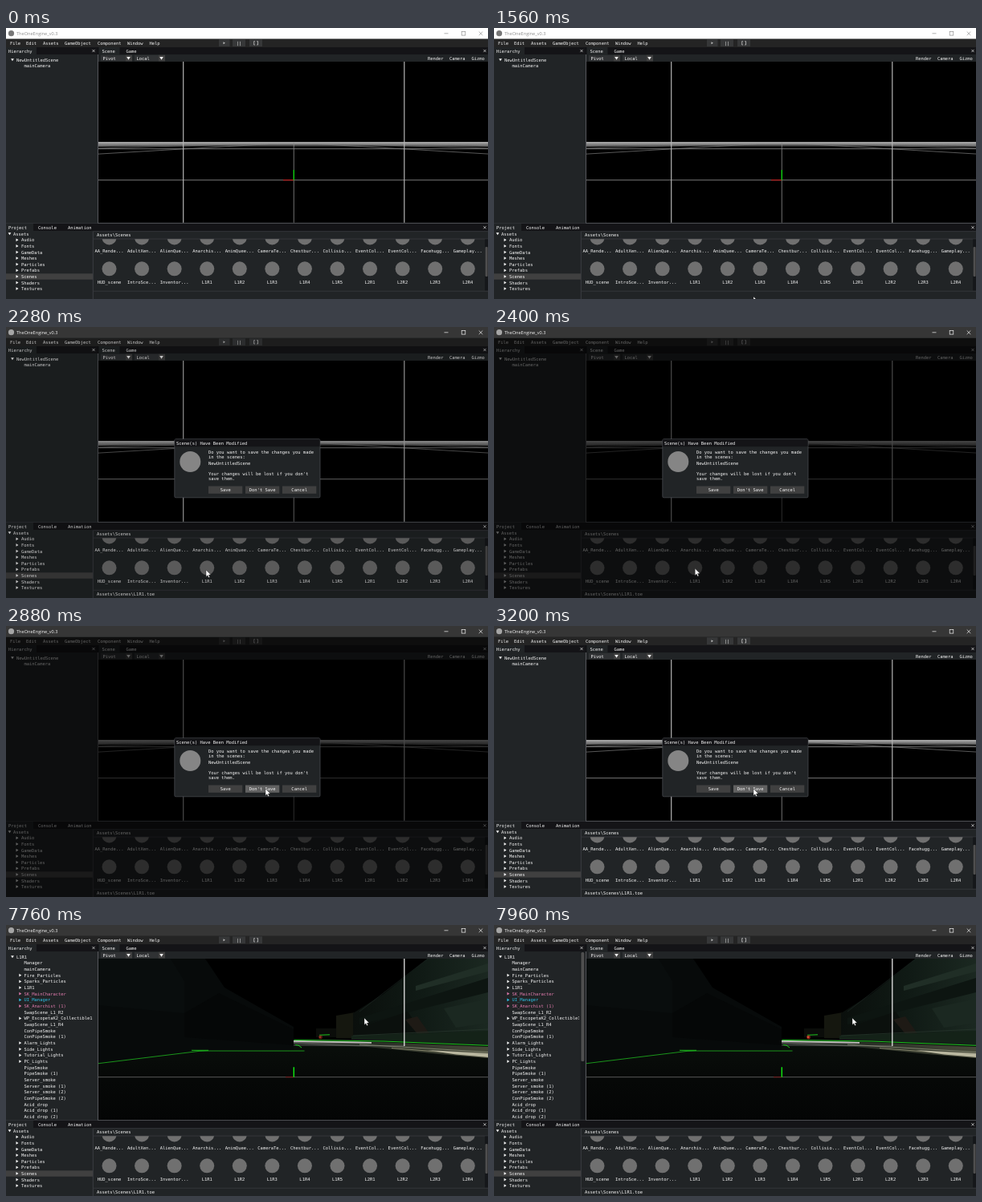
Animation, 600 px wide and 338 px high, one loop 8 s. Source, as an HTML page:

```html
<!DOCTYPE html>
<html lang="en">
<head>
<meta charset="utf-8">
<title>Engine editor</title>
<style>
html, body { margin: 0; width: 100%; height: 100%; overflow: hidden; background: #000; }
svg { display: block; width: 100vw; height: 100vh; }
text { font: 5.45px "DejaVu Sans Mono", monospace; fill: #f4f4f4; text-rendering: geometricPrecision; white-space: pre; }
#appName { font: 5.6px "Open Sans", sans-serif; }
</style>
</head>
<body>
<svg id="stage" viewBox="0 0 600 338" preserveAspectRatio="none">
<defs>
  <clipPath id="view"><rect x="115" y="42" width="485" height="200.8"/></clipPath>
  <clipPath id="files"><rect x="109" y="263.3" width="487" height="64"/></clipPath>
  <clipPath id="tree"><rect id="treeClip" x="0" y="33" height="209.5"/></clipPath>
  <linearGradient id="rightWall"><stop offset="0" stop-color="#0a0f0c"/><stop offset=".5" stop-color="#101a15"/><stop offset="1" stop-color="#1b2821"/></linearGradient>
  <linearGradient id="floor" x2="0" y2="1"><stop offset="0" stop-color="#0a0f0b"/><stop offset=".5" stop-color="#060807"/><stop offset="1" stop-color="#040505"/></linearGradient>
  <linearGradient id="shine"><stop offset="0" stop-color="#8d8d88"/><stop offset=".4" stop-color="#3b4336"/><stop offset="1" stop-color="#6f7058"/></linearGradient>
</defs>
<g id="ui"></g>
<g id="emptyView" clip-path="url(#view)"></g>
<g id="levelView" clip-path="url(#view)"></g>
<g id="emptyTree"></g>
<g id="levelTree" clip-path="url(#tree)"></g>
<g id="treeBar"></g>
<g id="titleBar"></g>
<rect id="dim" y="14" width="600" height="324"/>
<g id="dialog"></g>
<path id="cursor" d="M0 0V8.4L1.9 6.7 3.2 9.6 4.6 9 3.3 6.2 6 6Z" fill="#fff" stroke="#222" stroke-width=".4"/>
</svg>
<script>
const $ = id => document.getElementById(id);
const PANEL = '#212426', DARK = '#141417', BUTTON = '#404040', HOVER = '#616161', ICON = '#707070', BORDER = '#55565b';
const LOOP = 8000, ROW = 7.67;

const rect = (x, y, w, h, fill, more = '') =>
  `<rect x="${x}" y="${y}" width="${w}" height="${h}" fill="${fill}" ${more}/>`;
const poly = (points, fill, more = '') => `<polygon points="${points}" fill="${fill}" ${more}/>`;
const line = (x1, y1, x2, y2, color, w = .8) =>
  `<line x1="${x1}" y1="${y1}" x2="${x2}" y2="${y2}" stroke="${color}" stroke-width="${w}"/>`;
const dot = (x, y, r, fill, more = '') => `<circle cx="${x}" cy="${y}" r="${r}" fill="${fill}" ${more}/>`;
// Text is placed by the middle of its capitals.
const label = (x, y, s, more = '') => `<text x="${x}" y="${y + 2}" ${more}>${s}</text>`;
const mid = (x, y, s) => label(x, y, s, 'text-anchor="middle"');
const right = (x, y, c = '#f4f4f4', r = 1.5) => poly(`${x - r},${y - r * 1.25} ${x + r},${y} ${x - r},${y + r * 1.25}`, c);
const down = (x, y, r = 1.9) => poly(`${x - r},${y - r * .75} ${x + r},${y - r * .75} ${x},${y + r * .85}`, '#f4f4f4');
const cross = (x, y, r = 1.6, c = '#e8e8e8') =>
  line(x - r, y - r, x + r, y + r, c, .7) + line(x - r, y + r, x + r, y - r, c, .7);

function drawUi() {
  let s = rect(0, 13, 600, 325, PANEL) + rect(0, 13.5, 600, 10.5, '#242424');
  [['File', 5], ['Edit', 25], ['Assets', 46], ['GameObject', 73], ['Component', 114], ['Window', 151], ['Help', 178.5]]
    .forEach(([name, x]) => s += label(x, 18.8, name));
  [265, 282, 303].forEach((x, i) => s += rect(x, 14.3, i ? 16 : 13.5, 8.8, '#363738'));
  s += right(271.7, 18.8, '#c4c4c4', 1.2) + mid(290, 18.8, '||')
    + `<path d="M309.9 16.6H308.7V21H309.9M312.3 16.6H313.5V21H312.3" fill="none" stroke="#f0f0f0" stroke-width=".6"/>`;

  // tab strips
  s += rect(0, 24, 114, 9, DARK) + rect(0, 24, 38, 9, PANEL) + label(3, 28.5, 'Hierarchy') + cross(109, 28.5);
  s += rect(115, 24, 485, 9, DARK) + rect(115.5, 24, 26, 9, PANEL)
    + label(119.5, 28.5, 'Scene') + label(149.5, 28.5, 'Game') + cross(596, 28.5);
  [[118, 39, 'Pivot'], [160, 38, 'Local']].forEach(([x, w, name]) =>
    s += rect(x, 33.8, w, 7.6, '#303234') + rect(x + w - 8, 33.8, 8, 7.6, BUTTON)
      + label(x + 2.5, 37.7, name) + down(x + w - 4.5, 37.7, 2.3));
  s += label(525, 37.7, 'Render') + label(552, 37.7, 'Camera') + label(579.5, 37.7, 'Gizmo');
  s += rect(114, 24, 1, 9, '#0f1012') + rect(114, 33, 1, 210, BORDER);

  // project panel
  s += rect(0, 244, 600, 9, DARK) + rect(0, 244, 34, 9, PANEL);
  s += rect(0, 243, 115, .8, '#303236') + rect(114, 242.8, 486, 1, BORDER);
  s += label(3, 248.8, 'Project') + label(40, 248.8, 'Console') + label(77, 248.8, 'Animation') + cross(596, 248.8);
  s += rect(0, 306.3, 108, 7.4, BUTTON);
  s += down(4.5, 256.7) + label(9, 256.7, 'Assets');
  'Audio Fonts GameData Meshes Particles Prefabs Scenes Shaders Textures'.split(' ').forEach((name, i) => {
    const y = 264.3 + i * 7.6;
    s += right(14, y) + label(19, y, name);
  });
  s += rect(107.8, 253.5, 1, 84.5, '#3c3d42') + rect(108.8, 253.5, 491, .6, '#3c3d42');
  s += label(113, 258.2, 'Assets\\Scenes') + rect(109, 262.7, 491, .7, '#3c3d42');
  const rows = ['AA_Rende... AdultXen... AlienQue... Anarchis... AnimQuee... CameraTe... Chestbur... Collisio... EventCol... EventCol... Facehugg... Gameplay...',
    'HUD_scene IntroSce... Inventor... L1R1 L1R2 L1R3 L1R4 L1R5 L2R1 L2R2 L2R3 L2R4'];
  s += '<g clip-path="url(#files)">';
  rows.forEach((names, r) => names.split(' ').forEach((name, i) => {
    const x = 128.5 + i * 40.57;
    s += dot(x, 261.5 + r * 38.8, 9, ICON) + mid(x, 278.3 + r * 38.6, name);
  }));
  s += '</g>' + rect(596.2, 263.4, 3.8, 64.3, '#15171a') + rect(596.6, 273, 3, 37, '#4f4f4f', 'rx="1"');
  s += rect(109, 327.8, 491, .7, '#3c3d42') + label(113, 333, 'Assets\\Scenes\\L1R1.toe', 'id="path"');
  $('ui').innerHTML = s;
}

function drawEmpty() {
  let s = rect(115, 42, 485, 201, '#000');
  const vx = 358.3, vy = 142.2;
  for (let n = 0; n < 20; n++) {
    const y = vy + 47.5 / (1 + 4.6 * n);
    s += line(115, y, 600, y, n ? '#999' : '#8c8c8c', n ? .75 : .85);
  }
  for (let k = 1; k < 22; k++)
    for (const side of [-1, 1])
      s += line(vx, vy + .6, vx + side * 260, vy + .6 + 260 * .059 / k, '#888', .65);
  s += line(115, 143.2, 600, 143.2, '#a4a4a4', 1.6);
  s += line(vx, 143, vx, 243, '#8c8c8c', .8);
  s += line(220.7, 42, 220.7, 243, '#b4b4b4', 1.2) + line(495.8, 42, 495.8, 243, '#b4b4b4', 1.2);
  s += line(345, 189.7, vx, 189.7, '#d01414', 1) + line(vx, 177, vx, 189.7, '#00e000', 1.2);
  $('emptyView').innerHTML = s;
}

function drawLevel() {
  let s = rect(115, 42, 485, 201, '#000') + rect(115, 142, 485, 101, 'url(#floor)');
  // left wall, ending in an upright edge
  s += poly('115,42 248,42 272,78 358,127 358,156 240,158 115,173', '#070a0a');
  s += poly('115,42 205,42 222,70 222,110 115,100', '#090d0d') + poly('222,110 265,85 358,130 358,150 222,140', '#050707');
  // far end of the corridor
  s += rect(386, 129, 26, 11, '#0b0d0a') + poly('411,113 440,108 440,141 411,141', '#15170f');
  // right wall with its panels and beams
  s += poly('432,110 470,86 525,42 600,42 600,150 432,143', 'url(#rightWall)');
  s += poly('440,116 600,66 600,84 440,124', '#0d1511') + poly('510,76 600,48 600,58 510,82', '#202e26');
  s += poly('440,128 500,108 520,138 440,140', '#0b100d') + poly('545,104 600,92 600,122 560,128', '#1b2821');
  s += poly('497,118 512,114 528,137 514,138', '#1e1a15') + poly('430,138 600,132 600,149 430,143', '#142218');
  s += line(525, 42, 440, 108, '#1c2823', .7) + line(600, 130, 432, 138, '#26352b', .8);
  // wet floor
  s += poly('358,144 430,144.5 600,152 600,166 540,161 450,152 358,148', 'url(#shine)', 'opacity=".6"');
  s += line(358, 144.9, 455, 146.8, '#c4c4c0', 1.8) + line(358, 149.8, 496, 151, '#777', .7);
  s += line(440, 149, 600, 158.5, '#8f917b', .8) + line(480, 153.5, 600, 163, '#8c8b70', .9);
  s += poly('525,156 600,160 600,165 560,161.5', '#e0dcc2', 'opacity=".7"');
  s += line(115, 189.7, 600, 189.7, '#6b6d6b', .8);
  s += `<path d="M115 172.7L240 157.4L252 157H371.5" fill="none" stroke="#1c9c1c" stroke-width=".95"/>`;
  s += `<path d="M231 156.3H252M358.5 143.4L470 145L600 150.3M360 149.5L364 150L368 153M390 137.3L403 136.8" fill="none" stroke="#1cc41c" stroke-width="1"/>`;
  s += line(495.8, 42, 495.8, 151, '#e4e4e4', 1.3);
  s += line(348, 189.7, 358, 189.7, '#7c1515', .9) + line(358.3, 177.3, 358.3, 189.7, '#10ec10', 1.4);
  s += `<g id="spark">${dot(391.5, 140, 2.4, '#c02c20', 'opacity=".75"') + dot(391, 139.8, 1.1, '#f06a40')}</g>`;
  $('levelView').innerHTML = s;
}

function drawTrees() {
  const top = 39.7;
  $('emptyTree').innerHTML = down(8, top) + label(13, top, 'NewUntitledScene') + label(22.5, top + ROW, 'mainCamera');
  // '+' marks a branch, '!' a pink one, '*' a cyan one
  const items = ['Manager', 'mainCamera', '+Fire_Particles', '+Sparks_Particles', '+L1R1', '!SK_MainCharacter',
    '*UI_Manager', '!SK_Anarchist (1)', 'SwapScene_L1_R2', '+WP_EscopetaK2_Collectible1', 'SwapScene_L1_R4',
    'ConPipeSmoke', 'ConPipeSmoke (1)', '+Alarm_Lights', '+Side_Lights', '+Tutorial_Lights', '+PC_Lights',
    'PipeSmoke', 'PipeSmoke (1)', 'Server_smoke', 'Server_smoke (1)', 'Server_smoke (2)', 'ConPipeSmoke (2)',
    'Acid_drop', 'Acid_drop (1)', 'Acid_drop (2)'];
  const colors = { '+': '#f4f4f4', '!': '#e07aac', '*': '#2cbfe4' };
  $('levelTree').innerHTML = down(8, top) + label(13, top, 'L1R1') + items.map((item, i) => {
    const y = top + (i + 1) * ROW, c = colors[item[0]];
    return c ? right(17.8, y, c) + label(22.5, y, item.slice(1), `style="fill:${c}"`) : label(22.5, y, item);
  }).join('');
  $('treeBar').innerHTML = rect(107.5, 33.5, 6, 209, '#16181b') + rect(108.4, 34, 4, 136, '#4f4f4f', 'rx="1.5"');
}

function drawTitle(active) {
  const ink = active ? '#f2f2f2' : '#8f8f8f';
  $('titleBar').innerHTML = rect(0, 0, 600, 13.5, active ? '#363636' : '#fff')
    + dot(6.5, 6.7, 3.6, active ? '#a5a5a5' : '#777')
    + `<text id="appName" x="13" y="8.8" style="fill:${ink}">TheOneEngine_v0.3</text>`
    + line(545.5, 6.8, 550.5, 6.8, ink, .7)
    + rect(567.2, 4.5, 4.6, 4.6, 'none', `stroke="${ink}" stroke-width=".7"`)
    + cross(591, 6.8, 2.3, ink);
}

function drawDialog() {
  let s = rect(209.8, 139.8, 181.2, 73, PANEL, 'rx="1.5" stroke="#505158" stroke-width=".7"')
    + rect(210.2, 140.2, 180.4, 9, DARK) + label(212, 144.5, 'Scene(s) Have Been Modified') + dot(229.3, 168, 13, '#858585');
  [['Do you want to save the changes you made', 156.3], ['in the scenes:', 162.3], ['NewUntitledScene', 170],
   ["Your changes will be lost if you don't", 183], ['save them.', 188.9]]
    .forEach(([words, y]) => s += label(252, y, words));
  [['Save', 252], ["Don't Save", 298], ['Cancel', 344]].forEach(([name, x], i) =>
    s += rect(x, 198.5, 42.3, 9.3, BUTTON, i === 1 ? 'id="discard"' : '') + mid(x + 21.2, 203.3, name));
  $('dialog').innerHTML = s;
}

const route = [[1560, 323, 335], [2040, 249, 303], [2360, 249, 303], [2880, 323, 203], [3880, 323, 203], [4280, 446, 116]];
function cursorAt(t) {
  const i = route.findIndex(p => p[0] > t);
  if (i < 0) return route[route.length - 1].slice(1);
  if (i === 0) return [323, 345];
  const [t0, x0, y0] = route[i - 1], [t1, x1, y1] = route[i];
  const u = (t - t0) / (t1 - t0), e = u * u * (3 - 2 * u);
  return [x0 + (x1 - x0) * e, y0 + (y1 - y0) * e];
}

const show = (id, on) => $(id).setAttribute('display', on ? 'inline' : 'none');
let titleActive = null;

function render(time) {
  const t = Math.floor(time / 40) * 40;
  const active = t >= 2080, loaded = t >= 7760, bar = t >= 7800;
  if (active !== titleActive) drawTitle(titleActive = active);
  show('path', active);
  show('emptyView', !loaded);
  show('emptyTree', !loaded);
  show('levelView', loaded);
  show('levelTree', loaded);
  show('treeBar', bar);
  $('treeClip').setAttribute('width', bar ? 106 : 113);
  $('spark').setAttribute('opacity', .8 + .2 * Math.cos(t / 60));

  show('dialog', t >= 2240 && !loaded);
  const dim = t < 3200 ? Math.min(1, Math.max(0, (t - 2240) / 120)) : 0;
  $('dim').setAttribute('opacity', .6 * dim);

  const [x, y] = cursorAt(t);
  show('cursor', t >= 1560);
  $('cursor').setAttribute('transform', `translate(${x} ${y})`);
  $('discard').setAttribute('fill', t > 2360 && y < 207.8 ? HOVER : BUTTON);
}

drawUi();
drawEmpty();
drawLevel();
drawTrees();
drawDialog();
const start = performance.now();
function tick() {
  render((performance.now() - start) % LOOP);
  requestAnimationFrame(tick);
}
tick();
</script>
</body>
</html>
```
